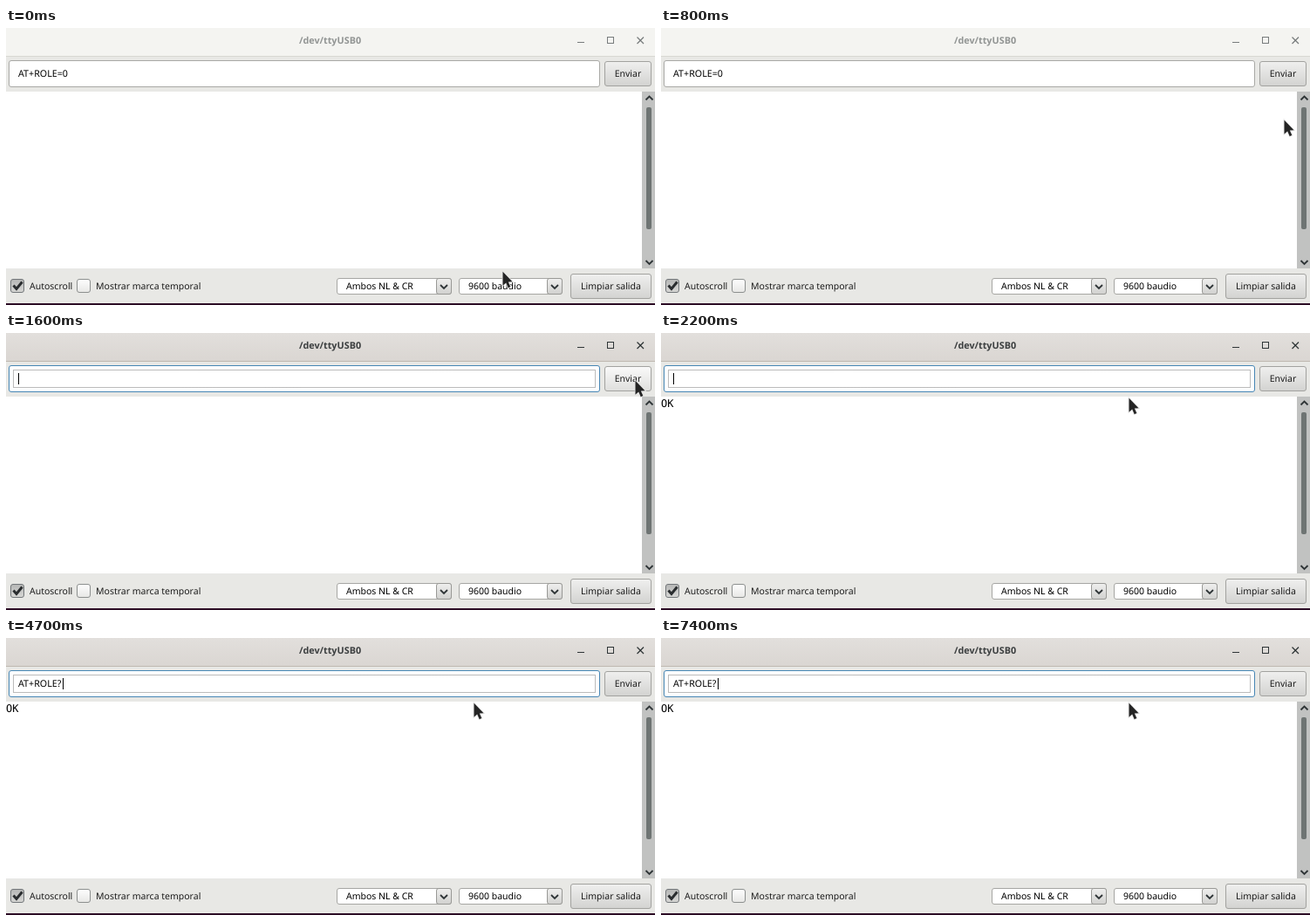
An HTML page with a canvas that plays this animation: 744 px wide and 318 px high, repeating every 8000 ms.

```html
<!DOCTYPE html>
<html lang="es">
<head>
<meta charset="utf-8">
<title>Monitor serie</title>
<style>
html, body { margin: 0; width: 744px; height: 318px; overflow: hidden; }
canvas { display: block; }
</style>
</head>
<body>
<canvas id="stage" width="744" height="318"></canvas>
<script>
const ctx = document.getElementById('stage').getContext('2d');
const LOOP = 8000;
const SANS = '"Noto Sans", sans-serif';

// [start ms, x, y] of the pointer tip
const pointerPath = [
  [0, 569, 279], [400, 582, 268], [500, 619, 237], [600, 659, 197],
  [700, 694, 143], [800, 714, 105], [1000, 729, 78], [1100, 732, 62],
  [1200, 721, 54], [1900, 648, 62], [2000, 569, 70], [2200, 536, 74]
];
// [start ms, typed text, caret x (0 = hidden)]
const inputStates = [
  [0, 'AT+ROLE=0', 0], [1600, '', 14], [2900, '', 0], [3300, 'AT+ROLE=0', 72],
  [4700, 'AT+ROLE?', 65], [5800, 'AT+ROLE?', 0], [7400, 'AT+ROLE?', 65]
];
const stateAt = (states, t) => states.filter(s => s[0] <= t).pop();

function rect(x, y, w, h, color) {
  ctx.fillStyle = color;
  ctx.fillRect(x, y, w, h);
}

function gradient(y, h, top, bottom) {
  const g = ctx.createLinearGradient(0, y, 0, y + h);
  g.addColorStop(0, top);
  g.addColorStop(1, bottom);
  return g;
}

function box(x, y, w, h, radius, fill, border) {
  ctx.beginPath();
  ctx.roundRect(x + .5, y + .5, w - 1, h - 1, radius);
  ctx.fillStyle = fill;
  ctx.fill();
  ctx.strokeStyle = border;
  ctx.lineWidth = 1;
  ctx.stroke();
}

function line(points, color, width) {
  ctx.beginPath();
  points.forEach(([x, y]) => ctx.lineTo(x, y));
  ctx.strokeStyle = color;
  ctx.lineWidth = width;
  ctx.stroke();
}

function label(text, x, y, color = '#1c1c1c', font = '10.5px ' + SANS, align = 'left') {
  ctx.font = font;
  ctx.textAlign = align;
  ctx.fillStyle = color;
  ctx.fillText(text, x, y);
}

function chevron(x, y, dir, size) {
  line([[x - size, y - dir * size / 2], [x, y + dir * size / 2], [x + size, y - dir * size / 2]], '#2e3436', 1.8);
}

function button(text, x, y, w, hover) {
  box(x, y, w, 29, 2.5, hover ? gradient(y, 29, '#fafafa', '#dededc') : gradient(y, 29, '#f0f0ef', '#d2d2d0'), '#a2a29f');
  label(text, x + w / 2, y + 18, '#1c1c1c', '10.5px ' + SANS, 'center');
}

function combo(text, x, w) {
  box(x, 287, w, 19, 2.5, '#fff', '#a6a6a3');
  box(x + w - 18, 287, 18, 19, 2.5, gradient(287, 19, '#f0f0ef', '#d0d0ce'), '#999996');
  chevron(x + w - 9, 297, 1, 4);
  label(text, x + 11, 300, '#000');
}

function checkbox(text, x, checked) {
  box(x, 288, 16, 16, 2.5, checked ? gradient(288, 16, '#b4b5b4', '#d8d8d6') : gradient(288, 16, '#fff', '#e6e6e4'), checked ? '#73777a' : '#8c8f8e');
  if (checked) line([[x + 3.5, 295.5], [x + 7, 299.5], [x + 13.5, 291.5]], '#2a2d2f', 3);
  label(text, x + 22, 300);
}

function titleBar(focused) {
  const ink = focused ? '#3c3f40' : '#929594';
  rect(0, 0, 744, 32, focused ? gradient(0, 32, '#e2dfdc', '#dad6d2') : '#f4f4f1');
  rect(0, 32, 744, 1, focused ? '#bfb8b1' : '#d7d7d2');
  label('/dev/ttyUSB0', 371.5, 18, ink, 'bold 10.8px ' + SANS, 'center');
  const icons = focused ? '#2e3436' : '#777b7c';
  rect(655, 16, 8, 1, icons);
  ctx.strokeStyle = icons;
  ctx.lineWidth = 1;
  ctx.strokeRect(689.5, 10.5, 7, 7);
  line([[723.5, 10.5], [731, 18]], icons, 1.3);
  line([[731, 10.5], [723.5, 18]], icons, 1.3);
}

function inputField(text, caret, focused) {
  box(3, 37, 678, 31, 2.5, '#fff', focused ? '#4686b4' : '#a8a8a5');
  if (focused) {
    ctx.setLineDash([1, 1]);
    ctx.strokeStyle = '#777';
    ctx.strokeRect(8.5, 42.5, 667, 20);
    ctx.setLineDash([]);
  }
  label(text, 14, 56, '#000', '10.7px ' + SANS);
  if (caret) rect(caret, 46, 1, 13, '#000');
}

function scrollBar() {
  rect(729, 73, 15, 203, '#c1c2c1');
  ctx.beginPath();
  ctx.roundRect(734, 91, 6, 140, 2);
  ctx.fillStyle = '#6e7473';
  ctx.fill();
  chevron(737.5, 80.5, -1, 4);
  chevron(737.5, 269, 1, 4);
}

function pointer(x, y) {
  const shape = [[0, 0], [0, 16], [3.7, 12.7], [6.2, 18.4], [8.8, 17.3], [6.3, 11.8], [11, 11.5]];
  ctx.beginPath();
  shape.forEach(([dx, dy]) => ctx.lineTo(x + .5 + dx, y + .8 + dy));
  ctx.closePath();
  ctx.strokeStyle = '#e4e4e4';
  ctx.lineWidth = 1.6;
  ctx.stroke();
  ctx.fillStyle = '#242424';
  ctx.fill();
}

function draw(t) {
  const focused = t >= 1600;
  const [, text, caret] = stateAt(inputStates, t);
  const [, px, py] = stateAt(pointerPath, t);

  rect(0, 0, 744, 318, '#e8e8e5');
  titleBar(focused);
  inputField(text, caret, focused);
  button('Enviar', 686, 38, 54, px >= 686 && py < 67);

  rect(0, 73, 729, 203, '#fff');
  if (t >= 1700) label('OK', 0, 85, '#000', '12px "DejaVu Sans Mono", monospace');
  scrollBar();

  checkbox('Autoscroll', 5, true);
  checkbox('Mostrar marca temporal', 81, false);
  combo('Ambos NL & CR', 379, 132);
  combo('9600 baudio', 519, 119);
  button('Limpiar salida', 647, 282, 93, false);
  rect(0, 316, 744, 2, '#2c0b25');
  pointer(px, py);
}

ctx.textRendering = 'geometricPrecision';
function tick() {
  draw(performance.now() % LOOP);
  requestAnimationFrame(tick);
}
tick();
</script>
</body>
</html>
```
